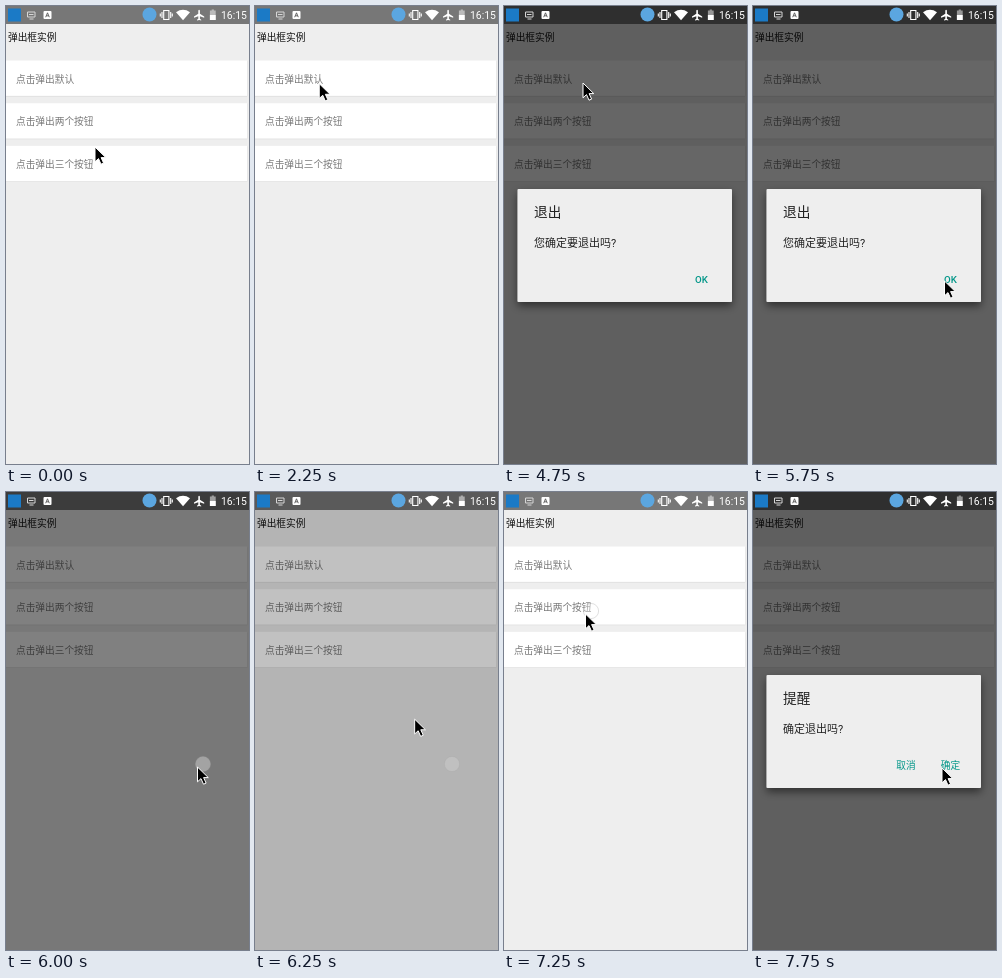
These frames come from a looping animation (243x458 px, 8000 ms). An HTML page:

```html
<!DOCTYPE html>
<html lang="zh-CN">
<head>
<meta charset="utf-8">
<title>弹出框实例</title>
<style>
html, body { margin: 0; width: 100%; height: 100%; overflow: hidden; background: #eee; }
svg { display: block; width: 100%; height: 100%; }
text { font-family: Roboto, "Noto Sans CJK SC", "Noto Sans CJK", sans-serif; font-size: 9.7px; }
.row { fill: #777; }
.action { fill: #009688; font-weight: 500; text-anchor: middle; }
.title { font-size: 13.7px; fill: #212121; }
.message { font-size: 11px; fill: #222; }
</style>
</head>
<body>
<svg viewBox="0 0 243 458">
  <defs>
    <filter id="shadow" x="-15%" y="-20%" width="130%" height="145%">
      <feDropShadow dx="0" dy="4" stdDeviation="4.5" flood-opacity=".5"/>
    </filter>
  </defs>

  <rect width="243" height="458" fill="#eee"/>
  <rect width="243" height="18" fill="#777"/>
  <text x="2" y="34.7" fill="#111">弹出框实例</text>
  <g id="rows"></g>
  <rect id="dim" width="243" height="458"/>

  <g fill="#fff">
    <rect x="2" y="2.5" width="13" height="13" fill="#1b7ac6"/>
    <path d="M21.5 6h7.5v5h-7.5zM23.5 13h4M23 8.5h4.5" fill="none" stroke="#d5d5d5"/>
    <rect x="37.5" y="5" width="8" height="8" rx="1"/>
    <path d="M39.7 11.2L41.5 6.8L43.3 11.2M40.4 9.8H42.6" fill="none" stroke="#555" stroke-width=".9"/>
    <circle cx="143.5" cy="8.5" r="7" fill="#5ba6e0"/>
    <path d="M157.7 4.5h5.2v9h-5.2zM156 6v6M164.7 6v6M154.3 7.5v3M166.3 7.5v3" fill="none" stroke="#fff" stroke-width="1.1"/>
    <path d="M170 6.2Q177 1.4 184 6.2L177 14.3z"/>
    <path d="M192.3 4.5q.8-1.6 1.6 0v3.2l4.3 2.7v1.3l-4.3-1.4v2.4l1.3 1v.9l-2.1-.6-2.1.6v-.9l1.3-1v-2.4l-4.3 1.4v-1.3l4.3-2.7z"/>
    <path d="M205.7 3.6h2.2v1h1.8v9.4h-5.8V4.6h1.8z" opacity=".5"/>
    <path d="M203.9 9h5.8v5h-5.8z"/>
    <text x="215" y="13.2" style="font-size:10.4px">16:15</text>
  </g>

  <g id="dialog">
    <rect x="13.5" y="183" width="214.5" height="113" rx="1" fill="#eee" filter="url(#shadow)"/>
    <text class="title" id="title" x="30" y="211"></text>
    <text class="message" id="message" x="30" y="240.5"></text>
    <text class="action" id="cancel" x="153" y="276.8"></text>
    <text class="action" id="confirm" x="197.5" y="276.8"></text>
  </g>

  <circle id="touch" r="7.6" fill="#fff" fill-opacity=".32" stroke="#999" stroke-opacity=".3"/>
  <path id="cursor" d="M0 0V14.8L3.5 11.6L6 17.2L8.6 16.1L6.1 10.6H10.8Z" stroke="#fff"/>
</svg>
<script>
const LOOP = 8000, TICK = 250, FADE = 590, DIM = .6;
const $ = id => document.getElementById(id);
const clamp = v => Math.max(0, Math.min(1, v));

$("rows").innerHTML = ["默认", "两个按钮", "三个按钮"].map((label, i) => {
  const y = 54.5 + i * 42.7;
  return `<rect y="${y + .7}" width="241.3" height="35.4" fill="#dcdcdc"/>
    <rect y="${y}" width="241" height="35.4" fill="#fff"/>
    <text class="row" x="10" y="${y + 22.1}">点击弹出${label}</text>`;
}).join("");

// Where the pointer heads: arrival time, ticks spent moving, position.
const stops = [
  { at: 0, ticks: 1, x: 89, y: 141 },
  { at: 250, ticks: 1, x: 63, y: 82 },
  { at: 1000, ticks: 1, x: 57, y: 78 },
  { at: 2500, ticks: 2, x: 79, y: 77 },
  { at: 5250, ticks: 2, x: 187, y: 293 },
  { at: 5500, ticks: 1, x: 204, y: 280 },
  { at: 5750, ticks: 1, x: 191.5, y: 275 },
  { at: 6500, ticks: 2, x: 95, y: 130 },
  { at: 7000, ticks: 2, x: 81.5, y: 122 },
  { at: 7750, ticks: 1, x: 189, y: 276 }
];
const taps = [
  { press: 3750, release: 4750 },
  { press: 6000, release: 6000 },
  { press: 7250, release: 7500 }
];
const dialogs = [
  { open: 4750, close: 5900, title: "退出", message: "您确定要退出吗?", cancel: "", confirm: "OK" },
  { open: 7500, close: LOOP, title: "提醒", message: "确定退出吗?", cancel: "取消", confirm: "确定" }
];

function pointerAt(t) {
  let { x, y } = stops[0];
  for (const stop of stops) {
    const duration = stop.ticks * TICK;
    const p = clamp((t - stop.at + duration) / duration) ** 1.6;
    x += (stop.x - x) * p;
    y += (stop.y - y) * p;
  }
  return { x, y };
}

function place(id, x, y) {
  $(id).setAttribute("transform", `translate(${x} ${y})`);
}

function render(t) {
  const { x, y } = pointerAt(t);
  place("cursor", x, y);

  const latest = dialogs.findLast(d => d.open <= t);
  const isOpen = Boolean(latest) && t < latest.close;
  $("dim").setAttribute("opacity", latest ? DIM * clamp(1 - (t - latest.close) / FADE) : 0);
  $("dialog").setAttribute("visibility", isOpen ? "visible" : "hidden");
  if (isOpen) {
    for (const id of ["title", "message", "cancel", "confirm"]) $(id).textContent = latest[id];
  }

  // A touch mark stays where it was pressed, fades on release and hides under a dialog.
  const tap = taps.findLast(d => d.press <= t);
  $("touch").setAttribute("opacity", tap && !isOpen ? clamp(1 - (t - tap.release) / (2 * TICK)) : 0);
  if (tap) {
    const spot = pointerAt(tap.press);
    place("touch", spot.x + 5.5, spot.y - 3);
  }
}

const start = performance.now();
function tick() {
  const t = (performance.now() - start) % LOOP;
  render(Math.floor(t / TICK) * TICK);
  requestAnimationFrame(tick);
}
tick();
</script>
</body>
</html>
```
